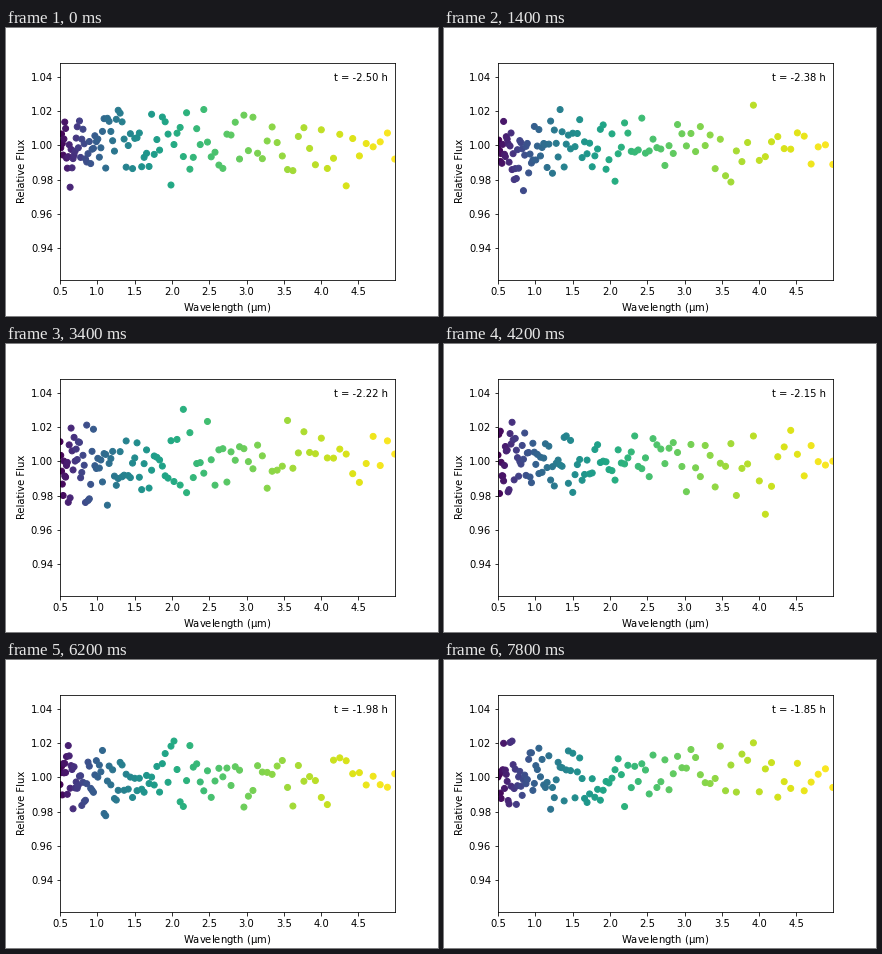
These frames come from a looping animation (432x288 px, 8 s). A matplotlib script:

```python
import numpy as np
import matplotlib.pyplot as plt
from matplotlib.animation import FuncAnimation

FRAMES, INTERVAL = 40, 200
START, STEP = -2.5, 1 / 60      # hours
COUNT, RESOLUTION = 116, 50
SIGMA = 0.0105

plt.rcParams.update({"font.family": "DejaVu Sans", "font.size": 10})

# Constant resolving power: equal steps in log wavelength
wave = 0.5 * np.exp(np.arange(COUNT) / RESOLUTION)


def spectrum(i):
    """Flat spectrum with fresh Gaussian noise for each exposure."""
    rng = np.random.default_rng(i)
    return rng.normal(1, SIGMA, COUNT)


fig, ax = plt.subplots(figsize=(6, 4), dpi=72)
fig.subplots_adjust(left=0.125, right=0.9, bottom=0.125, top=0.88)
dots = ax.scatter(wave, spectrum(0), c=np.log(wave), cmap="viridis")
label = ax.text(0.98, 0.95, "", transform=ax.transAxes, ha="right", va="top")

ax.set_xlim(wave[0], wave[-1])
ax.set_ylim(0.9213, 1.0485)
ax.set_xticks(np.arange(0.5, 4.6, 0.5))
ax.set_yticks(np.arange(0.94, 1.05, 0.02))
ax.set_xlabel(r"Wavelength ($\mathrm{\mu m}$)")
ax.set_ylabel("Relative Flux")


def update(i):
    dots.set_offsets(np.column_stack([wave, spectrum(i)]))
    label.set_text(f"t = {START + i * STEP:.2f} h")
    return dots, label


anim = FuncAnimation(fig, update, frames=FRAMES, interval=INTERVAL,
                     repeat=True, repeat_delay=0)
plt.show()
```
